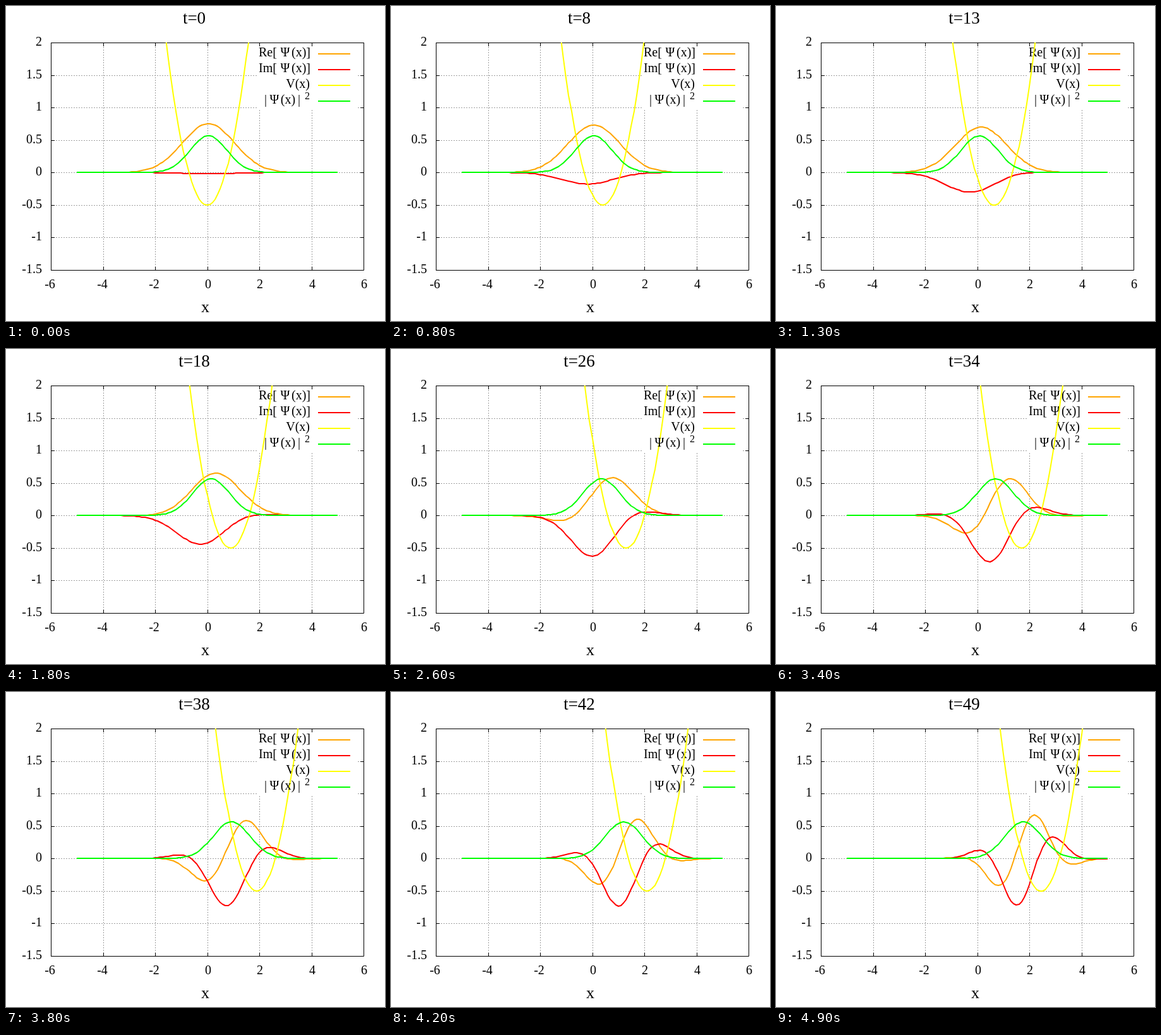
Write an HTML page with a canvas that moves like this. It is 600 px wide and 500 px high and loops after 5000 ms.

```html
<!DOCTYPE html>
<html lang="en">
<head>
<meta charset="utf-8">
<title>Wave packet in a moving harmonic well</title>
<style>
  html, body { margin: 0; width: 100%; height: 100%; overflow: hidden; background: #fff; }
  canvas { display: block; }
</style>
</head>
<body>
<canvas id="plot" width="600" height="500"></canvas>
<script>
const ctx = document.getElementById('plot').getContext('2d');
const LEFT = 71, RIGHT = 566, TOP = 58, BOTTOM = 419;
const KEY = { x0: 398, x1: 557, y1: 165 };
const FRAME_MS = 100, FRAMES = 50;
const DT = 0.05, OFFSET = 0.05, PHASE0 = -0.025;
const FONT = '"Liberation Serif", serif';

const px = x => Math.round(LEFT + (x + 6) / 12 * (RIGHT - LEFT));
const py = y => Math.round(TOP + (2 - y) / 3.5 * (BOTTOM - TOP));
const xTicks = [-6, -4, -2, 0, 2, 4, 6];
const yTicks = [-1.5, -1, -0.5, 0, 0.5, 1, 1.5, 2];

function text(str, x, y, align = 'left', size = 20) {
  ctx.fillStyle = '#000';
  ctx.font = size + 'px ' + FONT;
  ctx.textAlign = align;
  ctx.fillText(str, x, y);
}

function segment(x0, y0, x1, y1) {
  ctx.beginPath();
  ctx.moveTo(x0, y0);
  ctx.lineTo(x1, y1);
  ctx.stroke();
}

function drawGrid() {
  ctx.strokeStyle = '#a0a0a0';
  ctx.lineWidth = 1;
  ctx.setLineDash([2, 2]);
  for (const v of xTicks.slice(1, -1)) {
    const x = px(v) + 0.5;
    segment(x, BOTTOM, x, x > KEY.x0 ? KEY.y1 : TOP);
  }
  for (const v of yTicks.slice(1, -1)) {
    const y = py(v) + 0.5;
    if (y < KEY.y1) {
      segment(LEFT, y, KEY.x0, y);
      segment(KEY.x1, y, RIGHT, y);
    } else {
      segment(LEFT, y, RIGHT, y);
    }
  }
  ctx.setLineDash([]);
}

function drawAxes() {
  ctx.strokeStyle = '#000';
  ctx.lineWidth = 1;
  ctx.strokeRect(LEFT + 0.5, TOP + 0.5, RIGHT - LEFT, BOTTOM - TOP);
  for (const v of xTicks) {
    const x = px(v) + 0.5;
    segment(x, BOTTOM, x, BOTTOM - 5);
    segment(x, TOP, x, TOP + 6);
    text(v, px(v) + (v < 0 ? -1.5 : 1), 448, 'center');
  }
  for (const v of yTicks) {
    const y = py(v) + 0.5;
    segment(LEFT, y, LEFT + 6, y);
    segment(RIGHT, y, RIGHT - 5, y);
    text(v, 57, py(v) + 4.5, 'right');
  }
  text('x', 315.5, 486, 'center', 26);
}

function curve(f, color, keyY) {
  ctx.strokeStyle = color;
  ctx.lineWidth = 2;
  ctx.lineJoin = 'round';
  segment(494, keyY, 545, keyY);
  ctx.save();
  ctx.beginPath();
  ctx.rect(LEFT, TOP, RIGHT - LEFT, BOTTOM - TOP);
  ctx.clip();
  ctx.beginPath();
  for (let i = -50; i <= 50; i++) ctx.lineTo(px(i / 10), py(f(i / 10)));
  ctx.stroke();
  ctx.restore();
}

// Coherent state dragged by a well whose centre moves at unit speed.
function packet(t) {
  const s = Math.sin(t), c = Math.cos(t), d = OFFSET;
  const lag = d * c - s;
  const mean = t + lag;
  const momentum = 1 - c - d * s;
  const phase = PHASE0 + lag - d
    + (1 - d * d) * Math.sin(2 * t) / 4 + d * (1 - Math.cos(2 * t)) / 2;
  const amp = x => Math.PI ** -0.25 * Math.exp(-((x - mean) ** 2) / 2);
  const angle = x => phase + momentum * (x - mean);
  return {
    re: x => amp(x) * Math.cos(angle(x)),
    im: x => amp(x) * Math.sin(angle(x)),
    density: x => amp(x) ** 2
  };
}

function psiLabel(part, y) {
  text(part + '[', 400, y);
  text('Ψ', 442, y, 'center');
  text('(x)]', 482, y, 'right');
}

function densityLabel(y) {
  text('|', 411, y, 'center');
  text('Ψ', 425, y, 'center');
  text('(x)', 446.5, y, 'center');
  text('|', 464, y, 'center');
  text('2', 477, y - 7, 'center', 16);
}

function draw(n) {
  const t = n * DT, psi = packet(t);
  ctx.fillStyle = '#fff';
  ctx.fillRect(0, 0, 600, 500);
  drawGrid();
  drawAxes();
  text('t=' + n, 298, 28, 'center', 27);

  psiLabel('Re', 80);
  curve(psi.re, '#ffa500', 76);
  psiLabel('Im', 105);
  curve(psi.im, '#ff0000', 101);
  text('V(x)', 481, 130, 'right');
  curve(x => (x - t) ** 2 - 0.5, '#ffff00', 126);
  densityLabel(155);
  curve(psi.density, '#00ff00', 151);
}

function tick() {
  draw(Math.floor(performance.now() / FRAME_MS) % FRAMES);
  requestAnimationFrame(tick);
}
tick();
</script>
</body>
</html>
```
